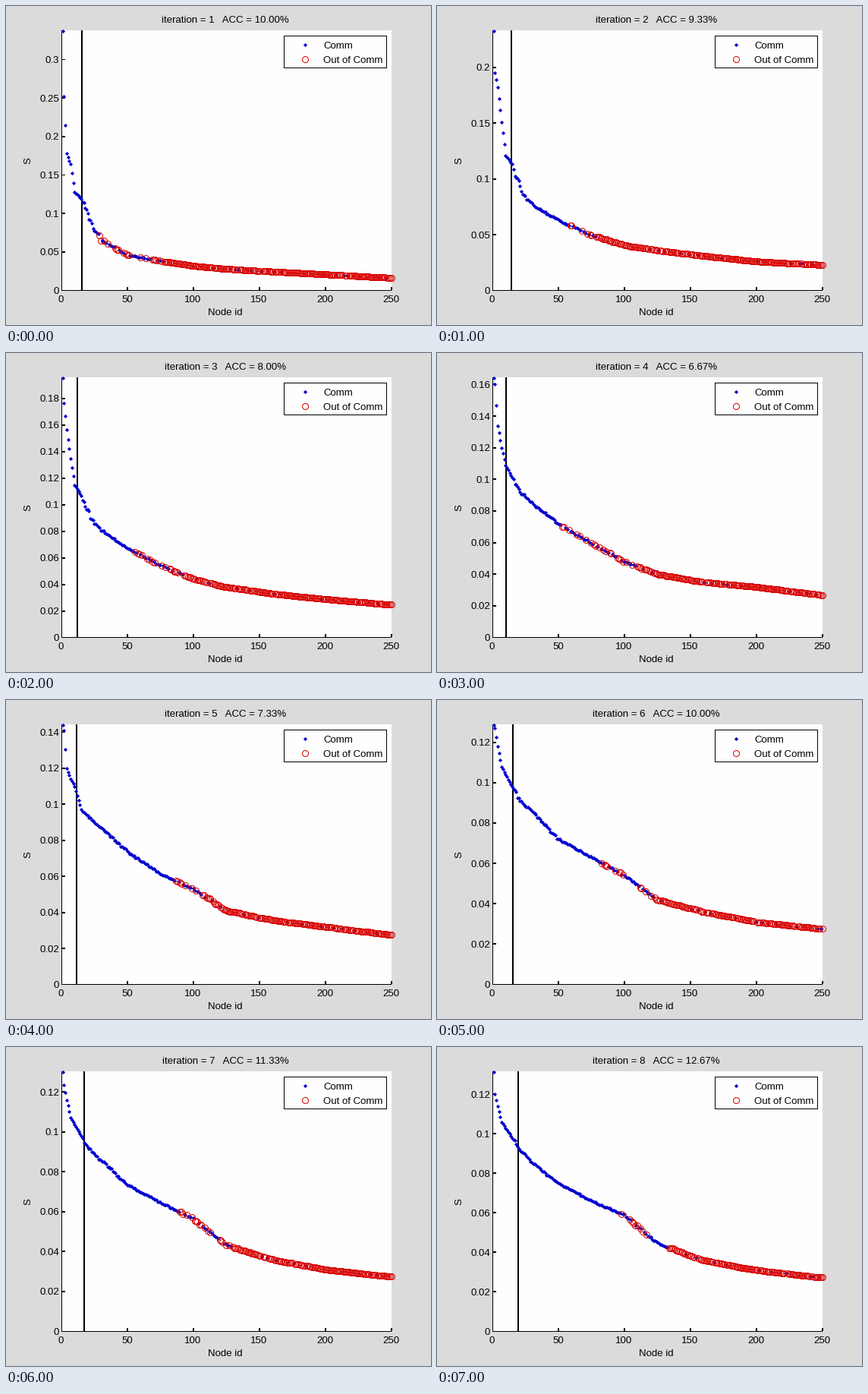
These frames come from a looping animation (560x420 px, 8000 ms). A matplotlib script:

```python
import numpy as np
import matplotlib.pyplot as plt
from matplotlib.animation import FuncAnimation
from matplotlib.patches import Rectangle

W, H, DPI = 560, 420, 80
PX = 72 / DPI  # points per pixel
LEFT, RIGHT, TOP, BOTTOM = 73, 508, 32, 374
NODES = np.arange(1, 251)
COUNT = 8
BLUE, RED = "#0000d0", "#d80000"

plt.rcParams["font.family"] = "Liberation Sans"

# Key iterations; the others lie between their neighbours.
KEYS = [1, 2, 4, 5, 6, 8]
SIZE = [15, 14, 10, 11, 15, 19]       # community size
FIRST = [29, 59, 53, 87, 83, 98]      # first node outside
DENSE = [79, 79, 110, 115, 126, 134]  # from here nearly all are outside

# Scores in thousandths at a few nodes, one row per key iteration.
KNOTS = [1, 2, 4, 7, 10, 15, 22, 30, 50, 75, 100, 125, 160, 200, 250]
SCORES = np.array([
    [337.5, 252, 178, 164, 128, 119, 90, 66, 46, 38.5, 32, 28, 24.5, 21, 16.3],
    [232.7, 195, 182, 151, 121, 113, 89, 77, 63, 49.5, 40.5, 36, 31, 26, 22.8],
    [164.3, 160, 134, 120, 109, 101, 91.5, 85, 72, 59.5, 48, 40, 35, 32, 26.7],
    [144.2, 141, 120, 114, 110, 97, 92, 87, 73.8, 61.6, 53, 41, 35.7, 32, 27.5],
    [128.7, 127, 118, 108, 104, 98, 90, 86, 72, 63.2, 54, 42, 36, 31, 27.5],
    [131.5, 120, 114, 106, 103, 98, 91, 85.5, 75, 66, 59, 44.6, 36, 31, 27.3],
])


def at(iteration, values):
    return np.interp(iteration, KEYS, values)


def iteration_data(it):
    """Community size, falling scores and the mask of outside nodes."""
    rng = np.random.default_rng(it)
    keys = np.exp([at(it, col) for col in np.log(SCORES / 1000).T])
    jitter = rng.uniform(-1.2, 1.2, NODES.size) * (NODES > 15)
    scores = np.sort(np.interp(NODES + jitter, KNOTS, keys))[::-1]

    first, dense = at(it, FIRST), at(it, DENSE)
    chance = np.where(NODES < dense, .35, .92)
    outside = (rng.random(NODES.size) < chance) & (NODES > first)
    outside |= NODES == int(first)
    return round(at(it, SIZE)), scores, outside


fig = plt.figure(figsize=(W / DPI, H / DPI), dpi=DPI, facecolor="#dbdbdb")
ax = fig.add_axes([0, 0, 1, 1])


def line(x, y):
    ax.plot(x, y, color="black", lw=PX, antialiased=False, snap=False,
            solid_capstyle="butt")


def label(x, y, text, ha="center", **style):
    style.setdefault("va", "baseline")
    ax.text(x, y, text, ha=ha, size=13.3 * PX, color="black", **style)


def box(x, y, w, h, edge="none"):
    ax.add_patch(Rectangle((x, y), w, h, fc="#fefefe", ec=edge, lw=PX,
                           antialiased=False, snap=False))


def dots(x, y):
    ax.plot(np.subtract(x, .5), y, "D", ms=3.7 * PX, color=BLUE, mew=0)


def rings(x, y):
    ax.plot(np.subtract(x, .5), y, "o", ms=8 * PX, mfc="none", mec=RED,
            mew=PX)


def x_pos(node):
    return LEFT + .5 + 1.738 * node


def y_pos(score, top):
    return BOTTOM + .5 - (BOTTOM - TOP) * score / top


def legend():
    box(366.5, 39.5, 135, 42, "black")
    dots([394.4], [51])
    rings([394.4], [70])
    label(418, 56, "Comm", "left")
    label(418, 75, "Out of Comm", "left")


def frame_axes(top):
    line([LEFT + .5] * 2, [TOP, BOTTOM + 1])
    line([LEFT, RIGHT], [BOTTOM + .5] * 2)
    for node in range(0, 251, 50):
        x = x_pos(node)
        line([x, x], [BOTTOM - 4, BOTTOM])
        label(x - 1, 390, str(node))
    gap = .05 if top > .2 else .02
    for k in range(int(top / gap) + 1):
        y = y_pos(k * gap, top)
        line([LEFT, LEFT + 5], [y, y])
        label(70, y + 4.5, f"{k * gap:.3g}", "right")
    label(289, 407, "Node id")
    label(29.5, 204, "S", rotation=90, va="center")


def draw(i):
    size, scores, outside = iteration_data(i + 1)
    top = scores[0]
    ax.clear()
    ax.set(xlim=(0, W), ylim=(H, 0))
    ax.axis("off")
    box(LEFT, TOP, RIGHT - LEFT, BOTTOM - TOP)
    frame_axes(top)
    line([x_pos(size)] * 2, [TOP, BOTTOM])

    x, y = x_pos(NODES), y_pos(scores, top)
    dots(x[~outside], y[~outside])
    rings(x[outside], y[outside])
    legend()
    label(289, 22, f"iteration = {i + 1}   ACC = {size / 1.5:.2f}%")
    return []


anim = FuncAnimation(fig, draw, frames=COUNT, interval=1000,
                     init_func=lambda: [], repeat=True, repeat_delay=0)
plt.show()
```
